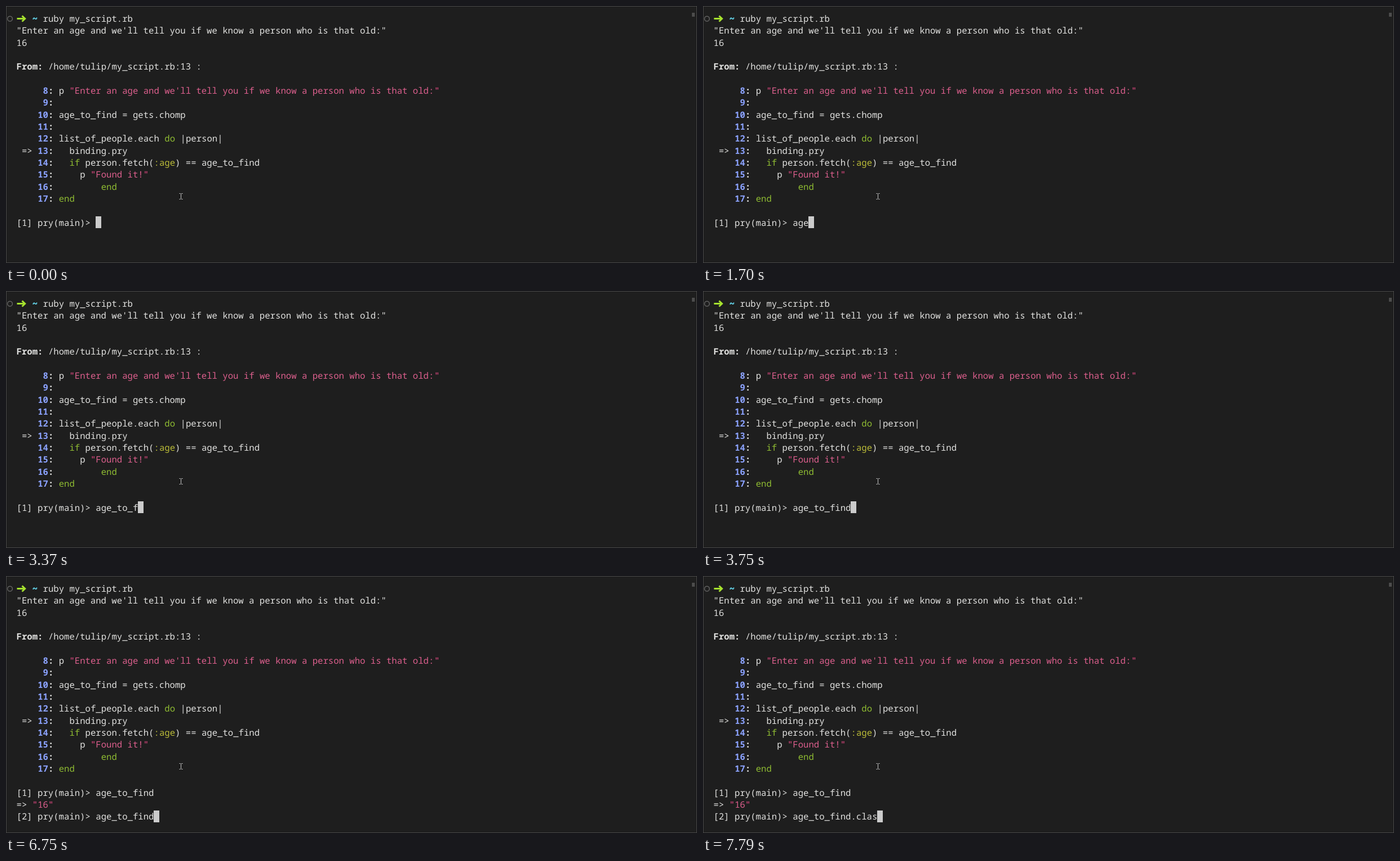
Write an HTML page that moves like this. It is 1226 px wide and 457 px high and loops after 8 s.

```html
<!DOCTYPE html>
<html lang="en">
<head>
<meta charset="utf-8">
<title>Terminal session</title>
<style>
  html, body { margin: 0; width: 100%; height: 100%; overflow: hidden; background: #1e1e1e; }
  svg { display: block; }
  text {
    font: 500 15.64px "Noto Sans Mono", "DejaVu Sans Mono", monospace;
    font-variant-ligatures: none;
    text-rendering: geometricPrecision;
    fill: #e2e2e0;
  }
  .bold { font-weight: 700; }
  .number { font-weight: 700; fill: #8ba2ff; }
  .string { fill: #dc5f8d; }
  .quote { fill: #f64d8c; }
  .keyword { fill: #8fbc32; }
  .symbol { fill: #bbbc38; }
  .home { font-weight: 700; fill: #66d9ef; stroke: #66d9ef; stroke-width: .6; }
</style>
</head>
<body>
<svg width="1226" height="457" viewBox="0 0 1226 457">
  <rect width="1226" height="457" fill="#1e1e1e"/>
  <rect x=".5" y=".5" width="1225" height="456" fill="none" stroke="#484848"/>
  <rect x="1217" y="12" width="5" height="7" fill="#4c4c4c"/>
  <circle cx="7" cy="22.7" r="4.4" fill="none" stroke="#666" stroke-width="1.5"/>
  <path d="M19.5 22.5H33M28.5 17.5L33.7 22.5L28.5 27.5" fill="none" stroke="#a6e22e" stroke-width="3"/>
  <path d="M307.5 333.5h2l1 1l1-1h2M310.5 334.5v8M307.5 343.5h2l1-1l1 1h2" fill="none" stroke="#ccc"/>
  <g id="screen"></g>
  <g id="reply"></g>
  <rect id="cursor" height="21" fill="#ccc"/>
</svg>
<script>
const LOOP = 8000, CELL = 9.384, LEFT = 18.6, PITCH = 21.33, TOP = 11.4, BASELINE = 16.6;
const FIRST_ROW = 17, SECOND_ROW = 19, PROMPT_COLS = 15;
const byId = id => document.getElementById(id);
const screen = byId('screen'), reply = byId('reply'), cursor = byId('cursor');
const colX = col => LEFT + col * CELL;
const rowTop = row => TOP + row * PITCH;

function put(row, col, content, style = '', parent = screen) {
  const text = document.createElementNS('http://www.w3.org/2000/svg', 'text');
  text.setAttribute('x', colX(col));
  text.setAttribute('y', rowTop(row) + BASELINE);
  text.setAttribute('class', style);
  text.textContent = content;
  parent.append(text);
  return text;
}

function putString(row, col, content, parent) {
  put(row, col, '"', 'quote', parent);
  put(row, col + 1, content, 'string', parent);
  put(row, col + 1 + content.length, '"', 'quote', parent);
}

const question = "Enter an age and we'll tell you if we know a person who is that old:";

put(0, 3, '~', 'home');
put(0, 5, 'ruby my_script.rb');
put(1, 0, `"${question}"`);
put(2, 0, '16');
put(4, 0, 'From:', 'bold');
put(4, 6, '/home/tulip/my_script.rb:13 :');

for (let line = 8; line <= 17; line++) {
  put(line - 2, line < 10 ? 5 : 4, line, 'number');
  put(line - 2, 6, ':', 'bold');
}
put(6, 8, 'p');
putString(6, 10, question);
put(8, 8, 'age_to_find = gets.chomp');
put(10, 8, 'list_of_people.each');
put(10, 28, 'do', 'keyword');
put(10, 31, '|person|');
put(11, 1, '=>');
put(11, 10, 'binding.pry');
put(12, 10, 'if', 'keyword');
put(12, 13, 'person.fetch(');
put(12, 26, ':age', 'symbol');
put(12, 30, ') == age_to_find');
put(13, 12, 'p');
putString(13, 14, 'Found it!');
put(14, 16, 'end', 'keyword');
put(15, 8, 'end', 'keyword');
put(FIRST_ROW, 0, '[1] pry(main)>');

put(18, 0, '=>', '', reply);
putString(18, 3, '16', reply);
put(SECOND_ROW, 0, '[2] pry(main)>', '', reply);

// [time in ms, characters typed so far]
const first = {
  command: 'age_to_find',
  steps: [[950, 1], [1130, 2], [1700, 3], [2100, 4], [2350, 6], [3000, 7], [3370, 8], [3490, 10], [3750, 11]],
  node: put(FIRST_ROW, PROMPT_COLS, '')
};
const second = {
  command: 'age_to_find.clas',
  steps: [[6750, 11], [7280, 12], [7400, 13], [7550, 14], [7670, 15], [7790, 16]],
  node: put(SECOND_ROW, PROMPT_COLS, '', '', reply)
};
const pending = put(FIRST_ROW, PROMPT_COLS + 1, 'g');
pending.setAttribute('opacity', .5);

const REPLY_AT = 4420, ECHO_FROM = 1130, ECHO_TO = 1550;

function typedCount({ steps }, time) {
  return steps.reduce((count, [at, typed]) => time >= at ? typed : count, 0);
}

// The cursor covers its cell in whole pixels.
function placeCursor(row, col) {
  const x = Math.floor(colX(col));
  cursor.setAttribute('x', x);
  cursor.setAttribute('y', Math.round(rowTop(row)));
  cursor.setAttribute('width', Math.round(colX(col + 1)) - x);
}

function draw(time) {
  const answered = time >= REPLY_AT;
  const echoing = time >= ECHO_FROM && time < ECHO_TO;
  const firstCount = typedCount(first, time), secondCount = typedCount(second, time);

  // A key awaiting confirmation is shown dimmed.
  first.node.textContent = first.command.slice(0, echoing ? 1 : firstCount);
  second.node.textContent = second.command.slice(0, secondCount);
  pending.style.display = echoing ? '' : 'none';
  reply.style.display = answered ? '' : 'none';
  if (answered) placeCursor(SECOND_ROW, PROMPT_COLS + secondCount);
  else placeCursor(FIRST_ROW, PROMPT_COLS + firstCount);
}

const start = performance.now();
function tick() {
  draw((performance.now() - start) % LOOP);
  requestAnimationFrame(tick);
}
tick();
</script>
</body>
</html>
```
